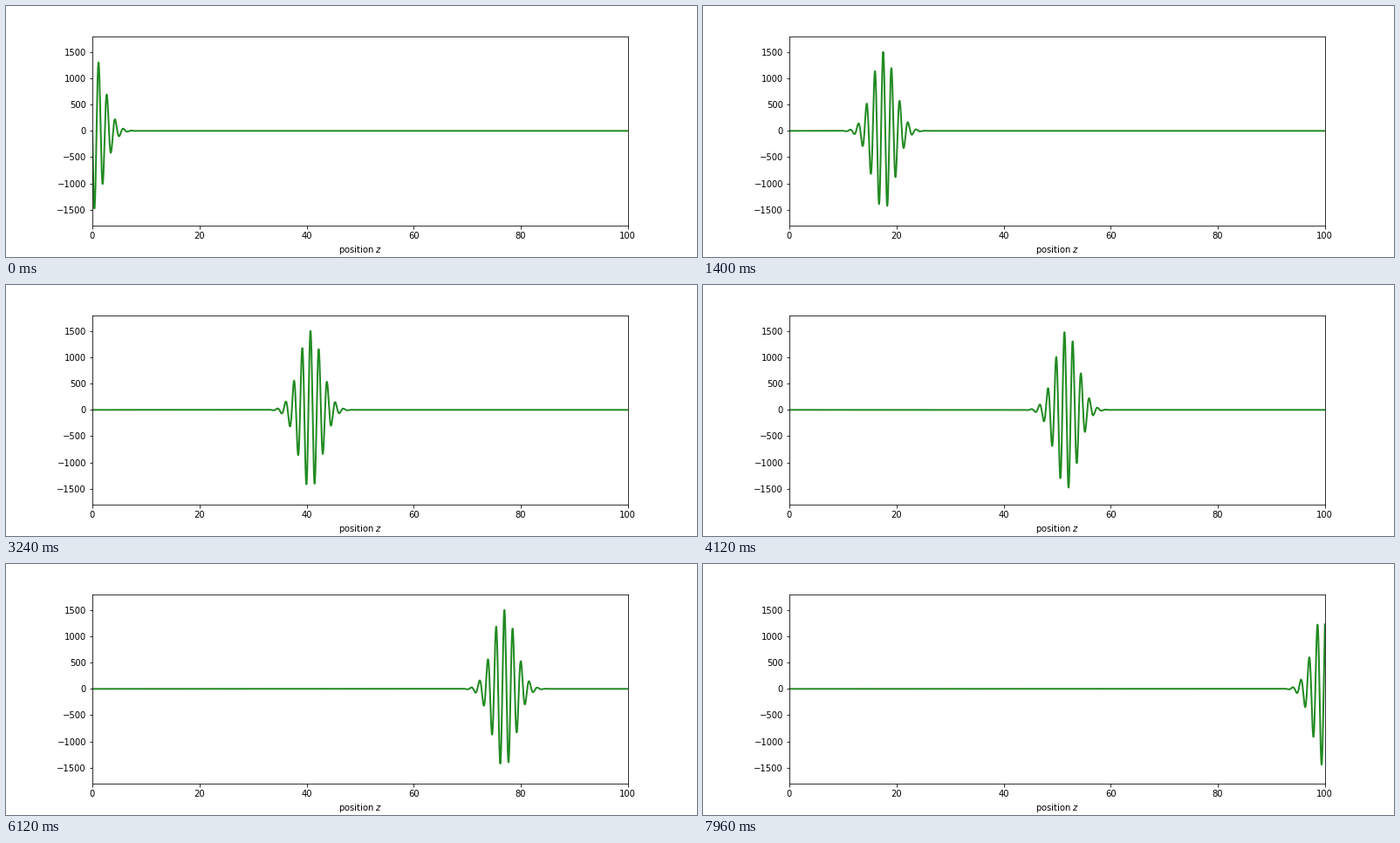
These frames come from a looping animation (792 by 288 pixels, 8 s). A matplotlib script:

```python
import numpy as np
import matplotlib.pyplot as plt
from matplotlib.animation import FuncAnimation

FRAMES = 200
LENGTH = 100        # extent of the z axis
AMPLITUDE = 1500
WAVELENGTH = 1.55
WIDTH = 3.06        # 1/e half width of the envelope
CYCLES = 0.12997    # carrier cycles per frame

plt.rcParams.update({"font.family": "DejaVu Sans", "font.size": 10})

z = np.linspace(0, LENGTH, 10000)


def pulse(frame):
    """Gaussian packet whose carrier and envelope move at different speeds."""
    center = LENGTH * frame / (FRAMES - 1)
    envelope = np.exp(-((z - center) / WIDTH) ** 2)
    return AMPLITUDE * envelope * np.sin(2 * np.pi * (CYCLES * frame - z / WAVELENGTH))


fig, ax = plt.subplots(figsize=(11, 4), dpi=72)
fig.subplots_adjust(left=0.125, right=0.9, bottom=0.125, top=0.88)
ax.set_xlim(0, LENGTH)
ax.set_ylim(-1800, 1800)
ax.set_xlabel("position $z$")
line, = ax.plot(z, pulse(0), color="forestgreen", lw=2)


def update(frame):
    line.set_ydata(pulse(frame))
    return line,


anim = FuncAnimation(fig, update, frames=FRAMES, interval=40,
                     repeat=True, repeat_delay=0)
plt.show()
```
